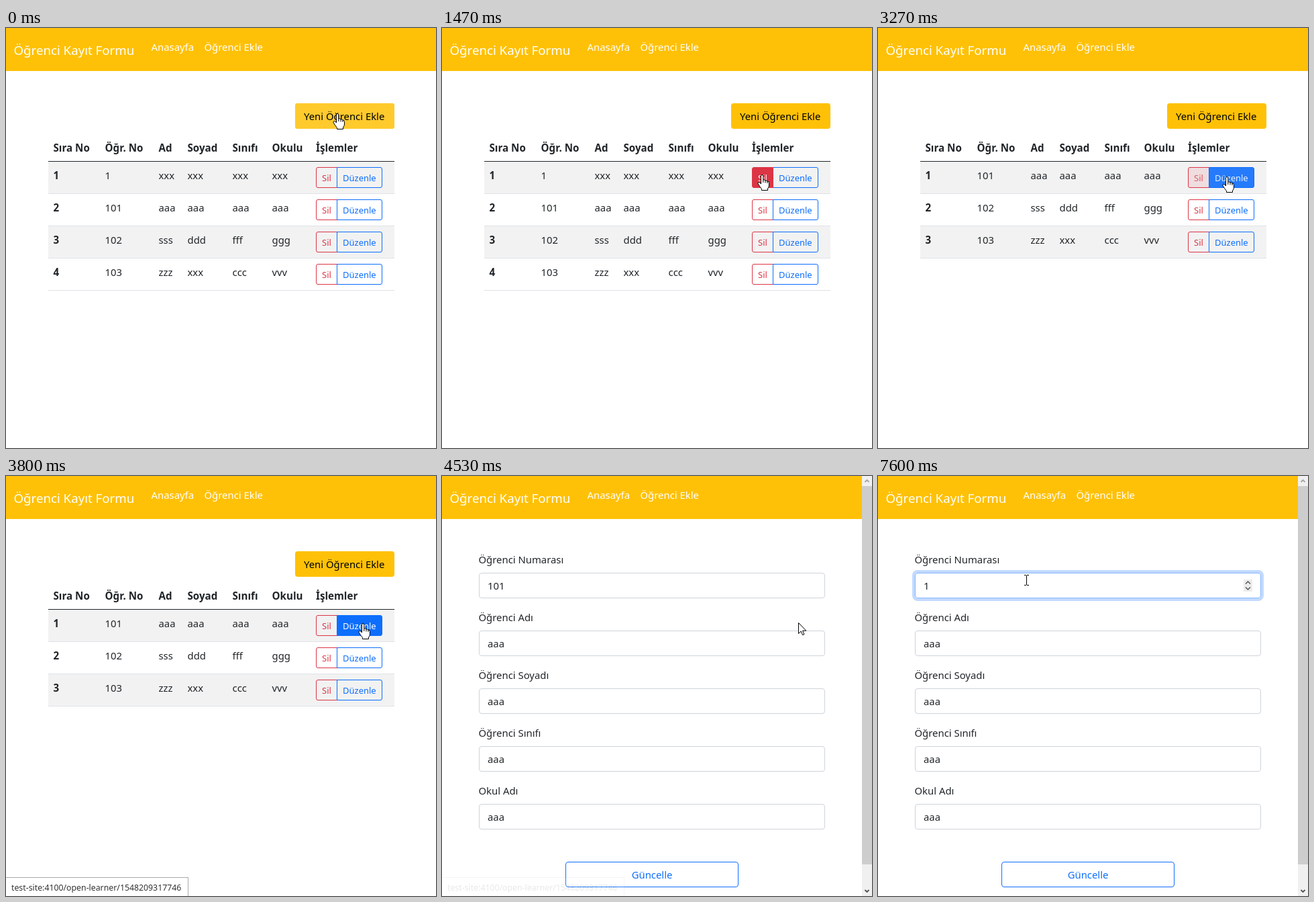
An HTML page for the animation above (8 s loop, 641 by 625 pixels).

```html
<!DOCTYPE html>
<html lang="tr">
<head>
<meta charset="utf-8">
<title>Öğrenci Kayıt Formu</title>
<style>
  html, body { margin: 0; width: 100%; height: 100%; overflow: hidden; background: #fff; }
  svg { display: block; font-family: "Noto Sans", "Open Sans", sans-serif; }
  text { white-space: pre; }
</style>
</head>
<body>
<svg id="stage" width="641" height="625" viewBox="0 0 641 625"></svg>
<script>
const stage = document.getElementById('stage');
const LOOP = 8000, TICKS_PER_MS = 15 / 1000;
const INK = '#212529', AMBER = '#ffc107', RED = '#dc3545', BLUE = '#0d6efd';
const BODY = 14.87, BOLD = 15.15, SMALL = 13, BRAND = 18.68;

const COLS = [70.5, 147.5, 227.5, 270.5, 337.5, 396.5, 462];
const HEADS = ['Sıra No', 'Öğr. No', 'Ad', 'Soyad', 'Sınıfı', 'Okulu', 'İşlemler'];
const STUDENTS = [
  '1 xxx xxx xxx xxx',
  '101 aaa aaa aaa aaa',
  '102 sss ddd fff ggg',
  '103 zzz xxx ccc vvv'
].map(s => s.split(' '));
const LABELS = ['Öğrenci Numarası', 'Öğrenci Adı', 'Öğrenci Soyadı', 'Öğrenci Sınıfı', 'Okul Adı'];

// Pointer path: tick, x, y, shape
const PATH = [
  [0, 494, 127, 'hand'], [9, 494, 127, 'hand'], [10, 491, 143, 'hand'],
  [11, 487, 155, 'arrow'], [12, 485, 163, 'arrow'], [13, 483, 173, 'beam'],
  [15, 480, 192, 'arrow'], [17, 478, 207, 'hand'], [22, 477, 218, 'hand'],
  [23, 479, 219, 'hand'], [46, 479, 219, 'hand'], [50, 533, 222, 'hand'],
  [51, 533, 222, 'hand'], [52, 536, 221, 'hand'], [57, 532, 219, 'hand'],
  [66, 532, 219, 'hand'], [67, 531, 218, 'arrow'], [74, 531, 218, 'arrow'],
  [75, 522, 221, 'arrow'], [77, 450, 204, 'arrow'], [79, 335, 172, 'beam'],
  [81, 235, 157, 'beam'], [82, 221, 155, 'beam'], [120, 221, 155, 'beam']
];
const POINTERS = {
  arrow: '<path d="M.5.5V16.5L4.2 13 6.6 18.6 9 17.6 6.6 12.2H11.8Z" fill="#fff" stroke="#000"/>',
  hand: `<path d="M-1.5 2Q-1.5.5 0 .5 1.8.5 1.8 2V8Q4 7.2 5 9 7 8.4 8 10 10.5 9.7 10.5 12.5V16
    Q10.5 19 8.5 21V23.5H-.5V21.5Q-3.5 18-6 13.5-6.3 11.5-4.5 11.5-3 11.5-1.5 14Z" fill="#fff" stroke="#000"/>
    <path d="M1.8 8V12M5 9V12.5M8 10V13" stroke="#000"/>`,
  beam: '<path d="M-3-7.5H0M1-7.5H4M.5-7V7M-3 7.5H0M1 7.5H4" stroke="#000"/>'
};

const ramp = (n, start, len = 2.25) => Math.min(1, Math.max(0, (n - start) / len));
const text = (x, y, s, size = BODY, fill = INK, extra = '') =>
  `<text x="${x}" y="${y}" font-size="${size}" fill="${fill}" ${extra}>${s}</text>`;
const bold = (x, y, s) => text(x, y, s, BOLD, INK, 'font-weight="700"');
const rect = (x, y, w, h, fill, extra = '') =>
  `<rect x="${x}" y="${y}" width="${w}" height="${h}" fill="${fill}" ${extra}/>`;
const box = (x, y, w, h, stroke) =>
  rect(x + .5, y + .5, w - 1, h - 1, '#fff', `rx="3.5" stroke="${stroke}"`);
const line = (d, stroke, width = 1) =>
  `<path d="${d}" fill="none" stroke="${stroke}" stroke-width="${width}"/>`;

function navbar(width) {
  return rect(0, 0, width, 64, AMBER) +
    text(11.5, 40, 'Öğrenci Kayıt Formu', BRAND, '#fff') +
    text(216.5, 34, 'Anasayfa', BODY, '#fff') +
    text(295.5, 34, 'Öğrenci Ekle', BODY, '#fff');
}

function smallButton(shape, x, y, label, color, hover) {
  const caption = (fill, alpha) => text(x, y + 21, label, SMALL, fill, `opacity="${alpha}"`);
  return `<path d="${shape}" fill="${color}" fill-opacity="${hover}" stroke="${color}"/>` +
    caption(color, 1 - hover) + caption('#fff', hover);
}

function actions(y, hoverDel, hoverEdit) {
  const top = y + .5;
  const left = `M493.5 ${top}h-28.5a2.5 2.5 0 0 0-2.5 2.5v25a2.5 2.5 0 0 0 2.5 2.5h28.5z`;
  const right = `M493.5 ${top}h64.5a2.5 2.5 0 0 1 2.5 2.5v25a2.5 2.5 0 0 1-2.5 2.5h-64.5z`;
  const del = smallButton(left, 471, y, 'Sil', RED, hoverDel);
  const edit = smallButton(right, 502, y, 'Düzenle', BLUE, hoverEdit);
  return hoverDel > hoverEdit ? edit + del : del + edit;
}

function listPage(n) {
  const students = n < 34 ? STUDENTS : STUDENTS.slice(1);
  const hoverAdd = 1 - ramp(n, 9);
  const hoverDel = ramp(n, 17) - ramp(n, 47);
  const hoverEdit = ramp(n, 47);
  let out = navbar(641) +
    rect(431, 112, 148, 38, AMBER, 'rx="4"') +
    rect(431, 112, 148, 38, '#ffca2c', `rx="4" opacity="${hoverAdd}"`) +
    text(444, 137, 'Yeni Öğrenci Ekle', BODY, '#000');
  HEADS.forEach((h, i) => out += bold(COLS[i], 184, h));
  students.forEach((cells, i) => {
    const y = 199 + 48 * i;
    if (i % 2 === 0) out += rect(63, y, 516, 47, '#f2f2f2');
    out += rect(63, y + 47, 516, 1, '#dee2e6') + bold(COLS[0], y + 26, i + 1);
    cells.forEach((c, k) => out += text(COLS[k + 1], y + 26, c));
    out += actions(y + 8, i ? 0 : hoverDel, i ? 0 : hoverEdit);
  });
  out += rect(63, 198, 516, 1, INK);
  if (n === 33) out += rect(460, 205, 36, 35, 'none', `rx="5" stroke="${RED}" stroke-width="4" opacity=".3"`);
  return out;
}

function scrollbar() {
  return rect(626, 0, 15, 625, '#f0f0f0') + rect(626, 15, 15, 563, '#cdcdcd') +
    line('M630.5 9l3-3 3 3', '#a3a3a3', 1.8) + line('M630.5 616l3 3 3-3', '#505050', 1.8);
}

function formPage(n) {
  const focused = n >= 90;
  const number = n < 108 ? '101' : n < 110 ? '10' : '1';
  const caretOn = focused && (n < 98 || (n >= 106 && n < 114));
  let out = navbar(626) + scrollbar();
  LABELS.forEach((label, i) => {
    const y = 144 + 86 * i;
    out += text(54.5, y - 14, label) +
      box(55, y, 516, 38, !i && focused ? '#86b7fe' : '#ced4da') +
      text(68, y + 25, i ? 'aaa' : number);
  });
  if (focused) out += rect(53, 142, 520, 42, 'none', `rx="6" stroke="${BLUE}" stroke-width="4" opacity=".25"`);
  if (n >= 79) out += rect(545, 154, 13, 18, '#ececec') +
    line('M548 160.5l3.5-3.5 3.5 3.5M548 165.5l3.5 3.5 3.5-3.5', '#505050', 1.4);
  if (caretOn) out += rect(Math.floor(68 + 8.5 * number.length), 152, 1, 21, '#000');
  return out + box(184, 574, 258, 38, BLUE) +
    text(313, 599, 'Güncelle', BODY, BLUE, 'text-anchor="middle"');
}

function statusBar(n) {
  const alpha = n < 50 ? 0 : n < 52 ? .4 : n < 67 ? 1 : n < 68 ? .5 : n < 69 ? .1 : 0;
  if (!alpha) return '';
  return `<g opacity="${alpha}">` + rect(-.5, 597.5, 272, 30, '#fff', 'stroke="#a9a9a9"') +
    text(8, 617, 'test-site:4100/open-learner/1548209317746', 12.3, '#333') + '</g>';
}

function pointer(n) {
  const i = PATH.findLastIndex(k => k[0] <= n);
  const a = PATH[i], b = PATH[i + 1] || a;
  const f = ramp(n, a[0], b[0] - a[0] || 1);
  const at = k => Math.round(a[k] + (b[k] - a[k]) * f);
  return `<g fill="none" transform="translate(${at(1)} ${at(2)})">${POINTERS[a[3]]}</g>`;
}

function scene(n) {
  const page = n < 65 ? listPage(n) : n < 67 ? '' : formPage(n);
  return page + statusBar(n) + pointer(n);
}

const start = performance.now();
let shown = -1;
function frame() {
  const t = (performance.now() - start) % LOOP;
  const n = Math.floor((t + 5) * TICKS_PER_MS) % 120;
  if (n !== shown) stage.innerHTML = scene(shown = n);
  requestAnimationFrame(frame);
}
frame();
</script>
</body>
</html>
```
